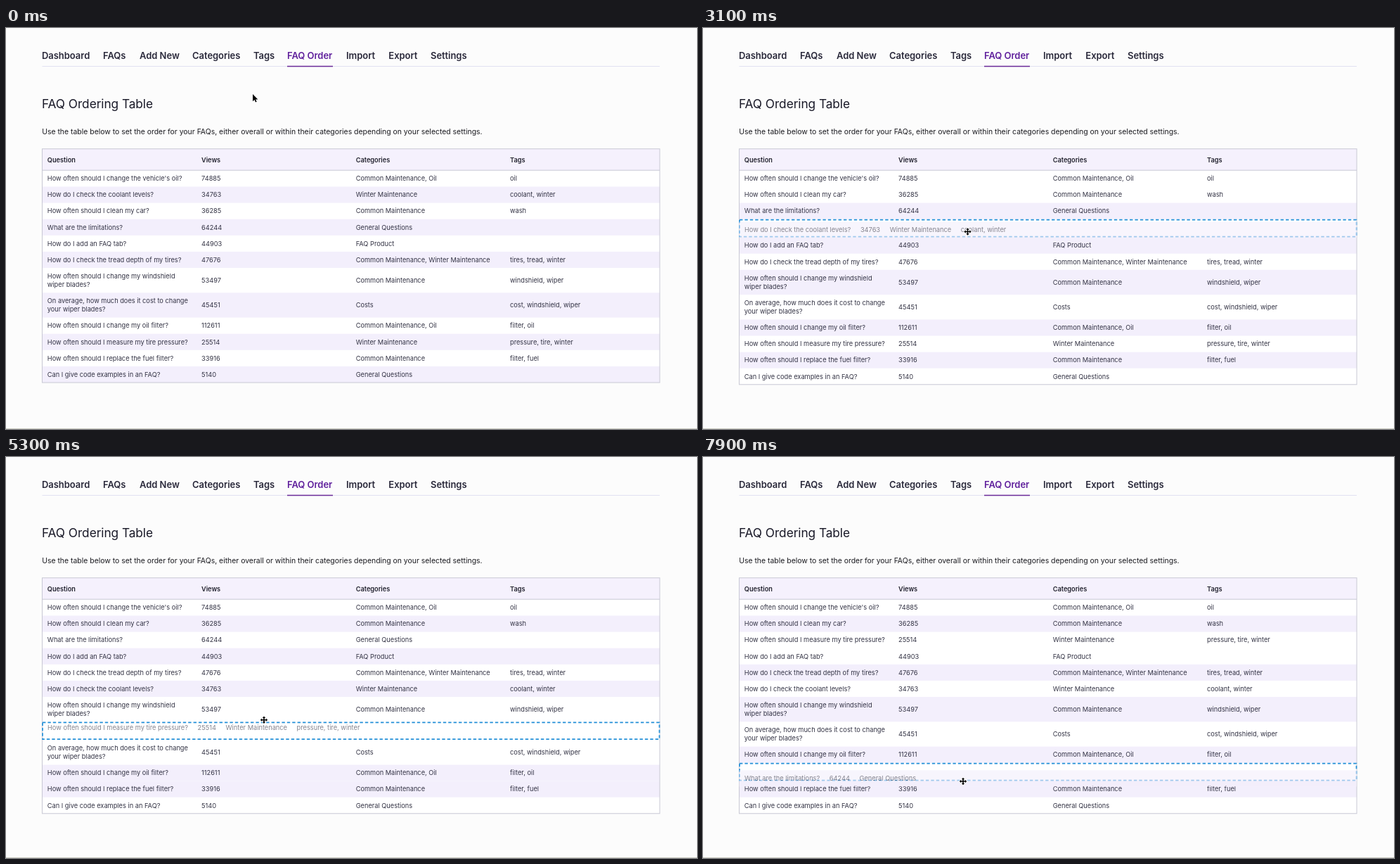
Recreate the animation shown at these times as an HTML page. Size 983 by 570 pixels, loop 8000 ms.

```html
<!DOCTYPE html>
<html lang="en">
<head>
<meta charset="utf-8">
<title>FAQ ordering</title>
<style>
  html, body { margin: 0; width: 100%; height: 100%; overflow: hidden; background: #fcfcfc; }
  svg { display: block; font-family: Inter, Roboto, sans-serif; }
  .nav { font-size: 13px; font-weight: 600; fill: #29283a; letter-spacing: -.04px; }
  .nav .on { fill: #5f1f9c; }
  .title { font-size: 17.3px; fill: #191928; letter-spacing: -.06px; }
  .intro { font-size: 10.43px; fill: #1b1b20; }
  .head { font-size: 9.2px; font-weight: 600; fill: #22222e; }
  .cell { font-size: 9.24px; fill: #333344; }
</style>
</head>
<body>
<svg id="stage" width="983" height="570" viewBox="0 0 983 570">
  <g id="page"></g>
  <g id="table"></g>
  <g id="cursor" stroke="#fff" stroke-width="1.4" paint-order="stroke" stroke-linejoin="round">
    <path id="arrow" d="M0 0V10.2L2.4 8L4 11.6L5.7 10.8L4.1 7.4H7.3Z"/>
    <path id="move" d="M0-5.2L2.2-2.8H.8V-.8H2.8V-2.2L5.2 0L2.8 2.2V.8H.8V2.8H2.2L0 5.2L-2.2 2.8H-.8V.8H-2.8V2.2L-5.2 0L-2.8-2.2V-.8H-.8V-2.8H-2.2Z"/>
  </g>
</svg>
<script>
const LOOP = 8000, STEP = 100;
const LEFT = 51.5, RIGHT = 930, HEAD_TOP = 171.8, BODY_TOP = 202.4;
const ROW = 23.1, TALL_ROW = 35.3, SLOT = 25.9, LINE = 12.4;
const COLUMNS = [58.8, 278, 497.7, 717];
const BORDER = '#c8c8d4', STRIPE = '#f3effc';

const nav = [['Dashboard', 51], ['FAQs', 138], ['Add New', 190], ['Categories', 265], ['Tags', 352],
  ['FAQ Order', 400], ['Import', 484], ['Export', 544.3], ['Settings', 604]];

// Question (| breaks the line), views, categories, tags
const rows = [
  ["How often should I change the vehicle's oil?", 74885, 'Common Maintenance, Oil', 'oil'],
  ['How do I check the coolant levels?', 34763, 'Winter Maintenance', 'coolant, winter'],
  ['How often should I clean my car?', 36285, 'Common Maintenance', 'wash'],
  ['What are the limitations?', 64244, 'General Questions', ''],
  ['How do I add an FAQ tab?', 44903, 'FAQ Product', ''],
  ['How do I check the tread depth of my tires?', 47676, 'Common Maintenance, Winter Maintenance', 'tires, tread, winter'],
  ['How often should I change my windshield|wiper blades?', 53497, 'Common Maintenance', 'windshield, wiper'],
  ['On average, how much does it cost to change|your wiper blades?', 45451, 'Costs', 'cost, windshield, wiper'],
  ['How often should I change my oil filter?', 112611, 'Common Maintenance, Oil', 'filter, oil'],
  ['How often should I measure my tire pressure?', 25514, 'Winter Maintenance', 'pressure, tire, winter'],
  ['How often should I replace the fuel filter?', 33916, 'Common Maintenance', 'filter, fuel'],
  ['Can I give code examples in an FAQ?', 5140, 'General Questions', '']
];

// Pointer path: time, x, y
const path = [[0, 351, 94], [1000, 351, 94], [2000, 374, 237.5], [2400, 374, 239.8], [3100, 376.5, 289.5],
  [3800, 372, 328], [4300, 364, 357], [4800, 366, 435.6], [6100, 369, 248], [6400, 368, 250],
  [6900, 358, 294], [7200, 358, 302.5], [7900, 370, 461], [8000, 370, 461]];

// grab: pointer offset from the row centre at pick-up and at drop
const drags = [
  { row: rows[1], start: 2400, end: 3800, grab: [2.5, 2.5] },
  { row: rows[9], start: 4800, end: 6400, grab: [-11, -11] },
  { row: rows[3], start: 6900, end: LOOP, grab: [10.7, 4] }
];

const $ = id => document.getElementById(id);
const smooth = p => p * p * (3 - 2 * p);
const mix = (a, b, p) => a + (b - a) * p;
const text = (x, y, s, cls) => `<text x="${x}" y="${y}" class="${cls}">${s}</text>`;
const rect = (x, y, w, h, fill) => `<rect x="${x}" y="${y}" width="${w}" height="${h}" fill="${fill}"/>`;
const line = (x1, x2, y, color, width = 1) =>
  `<path d="M${x1} ${y}H${x2}" stroke="${color}" stroke-width="${width}"/>`;
const heightOf = row => row[0].includes('|') ? TALL_ROW : ROW;

function pointerAt(t) {
  const i = Math.max(1, path.findIndex(k => k[0] > t));
  const [t0, x0, y0] = path[i - 1], [t1, x1, y1] = path[i];
  const p = smooth((t - t0) / (t1 - t0));
  return { x: mix(x0, x1, p), y: mix(y0, y1, p) };
}

function helperY(drag, t) {
  const p = smooth((t - drag.start) / (drag.end - drag.start));
  return pointerAt(t).y - mix(...drag.grab, p);
}

// Number of other rows the dragged row has passed
function slotFor(others, y) {
  let top = BODY_TOP, slot = 0;
  for (const row of others) {
    const h = heightOf(row);
    if (top + h / 2 < y - 12) slot++;
    top += h;
  }
  return slot;
}

function stateAt(t) {
  let order = rows;
  for (const drag of drags) {
    if (t < drag.start) break;
    const others = order.filter(r => r !== drag.row);
    const y = helperY(drag, Math.min(t, drag.end));
    const slot = slotFor(others, y);
    if (t < drag.end) return { order, others, slot, y, row: drag.row };
    order = [...others.slice(0, slot), drag.row, ...others.slice(slot)];
  }
  return { order, others: order, slot: -1, row: null };
}

function drawRow(row, top, striped) {
  const h = heightOf(row), base = top + h / 2 + 3.3;
  const lines = row[0].split('|');
  return (striped ? rect(LEFT, top, RIGHT - LEFT, h, STRIPE) : '')
    + lines.map((s, i) => text(COLUMNS[0], base + (i - (lines.length - 1) / 2) * LINE, s, 'cell')).join('')
    + row.slice(1).map((s, i) => text(COLUMNS[i + 1], base, s, 'cell')).join('');
}

function drawSlot(top) {
  return `<rect x="${LEFT + .5}" y="${top + 1}" width="${RIGHT - LEFT - 1}" height="${SLOT - 2}"
    fill="none" stroke="#2490d8" stroke-width="1.7" stroke-dasharray="4.4 3"/>`;
}

function drawHelper(row, y, striped) {
  const cells = row.filter(s => s !== '').map((s, i) => `<tspan dx="${i ? 13.6 : 0}">${s}</tspan>`).join('');
  return `<g opacity=".6">${striped ? rect(LEFT, y - ROW / 2, RIGHT - LEFT, ROW, STRIPE) : ''}
    ${text(59, y + 3.3, cells, 'cell')}</g>`;
}

function drawTable(state) {
  const { order, others, slot, y, row: dragged } = state;
  const home = order.indexOf(dragged);
  let top = BODY_TOP, body = '', slotMark = '';
  others.forEach((row, i) => {
    if (i === slot) { slotMark = drawSlot(top); top += SLOT; }
    // The lifted row and the slot both count in the striping
    const place = i + (dragged && i >= home ? 1 : 0) + (dragged && i >= slot ? 1 : 0);
    body += drawRow(row, top, place % 2 === 1);
    top += heightOf(row);
  });
  if (slot === others.length) { slotMark = drawSlot(top); top += SLOT; }
  const width = RIGHT - LEFT;
  const helperPlace = home + (slot < home ? 1 : 0);
  return rect(LEFT, HEAD_TOP, width, top - HEAD_TOP, '#fff')
    + rect(LEFT, HEAD_TOP, width, BODY_TOP - HEAD_TOP, '#f5f1fd')
    + ['Question', 'Views', 'Categories', 'Tags'].map((s, i) => text(COLUMNS[i], 190.5, s, 'head')).join('')
    + body + line(LEFT, RIGHT, BODY_TOP - .2, BORDER)
    + `<rect x="${LEFT}" y="${HEAD_TOP}" width="${width}" height="${top - HEAD_TOP}" fill="none" stroke="${BORDER}"/>`
    + slotMark + (dragged ? drawHelper(dragged, y, helperPlace % 2 === 1) : '');
}

$('page').innerHTML = rect(0, 0, 983, 570, '#fcfcfc')
  + `<g class="nav">${nav.map(([s, x]) => text(x, 44.4, s, s === 'FAQ Order' ? 'on' : '')).join('')}</g>`
  + line(LEFT, RIGHT, 54.5, '#e2e2f2') + line(400, 465, 54.5, '#6a2a98', 1.6)
  + text(51, 113.6, 'FAQ Ordering Table', 'title')
  + text(51.2, 150.7, 'Use the table below to set the order for your FAQs, either overall or within their categories depending on your selected settings.', 'intro')
  + line(0, 983, 569.5, '#cfcfc4');

function render(t) {
  $('table').innerHTML = drawTable(stateAt(t));
  const { x, y } = pointerAt(t);
  const overRow = y > BODY_TOP;
  $('cursor').setAttribute('transform', `translate(${x} ${y})`);
  $('arrow').style.display = overRow ? 'none' : '';
  $('move').style.display = overRow ? '' : 'none';
}

let shown = -1;
const begin = performance.now();
function tick() {
  const t = Math.floor((performance.now() - begin) % LOOP / STEP) * STEP;
  if (t !== shown) render(shown = t);
  requestAnimationFrame(tick);
}
tick();
</script>
</body>
</html>
```
